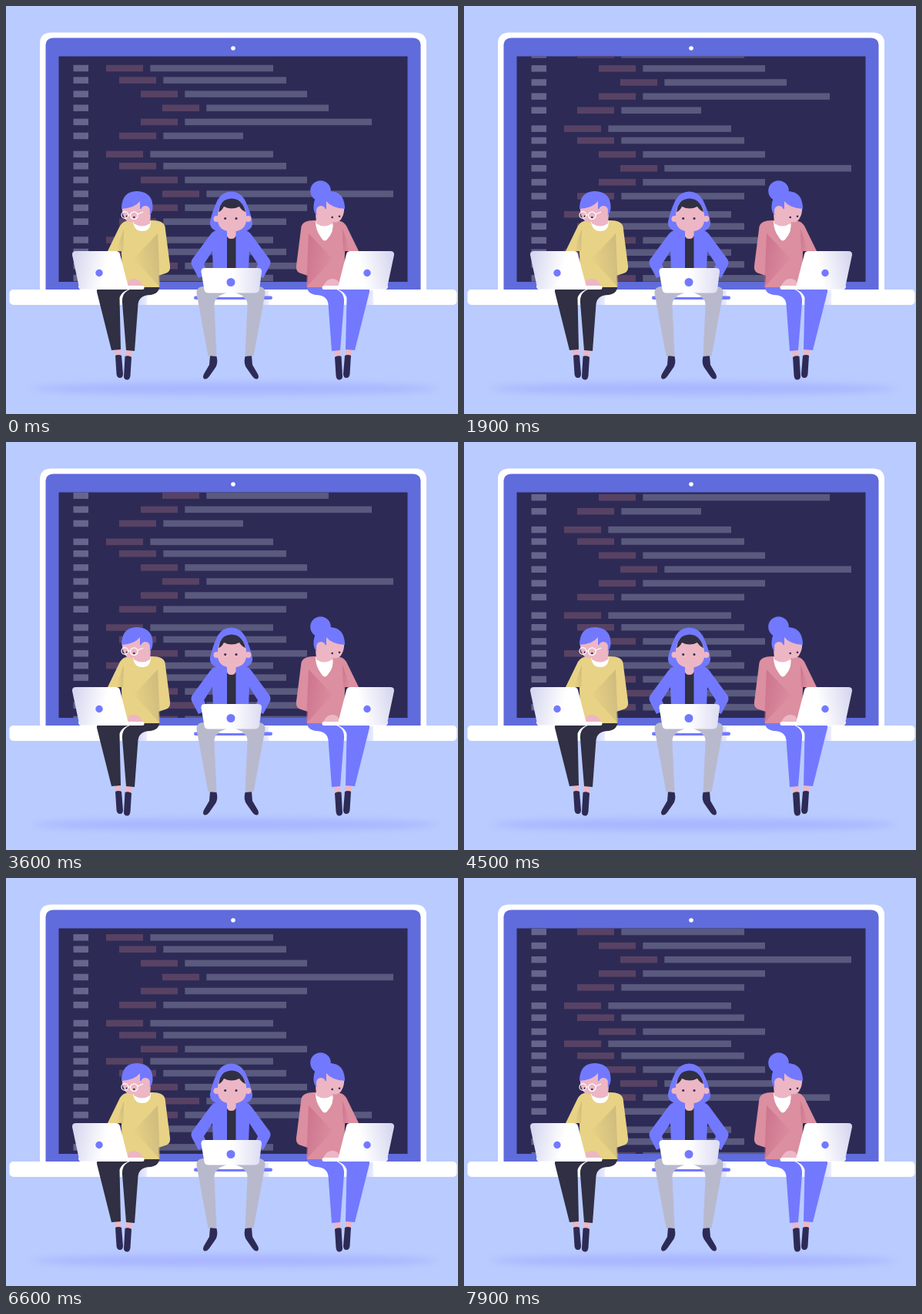
Write an HTML page that moves like this. It is 587 px wide and 531 px high and loops after 8000 ms.

```html
<!DOCTYPE html>
<html lang="en">
<head>
<meta charset="utf-8">
<title>Coding together</title>
<style>
  html, body { margin: 0; width: 100%; height: 100%; overflow: hidden; background: #bacbff; }
  svg { display: block; width: 587px; height: 531px; }
  .blue { fill: #7279ff; }
  .navy { fill: #2d2b55; }
  .skin { fill: #edb6c4; }
  .white { fill: #fff; }
  .top { fill: var(--top); }
  .shade { fill: var(--shade); }
  .legs { fill: var(--legs); }
  #ann { --top: #e8d285; --shade: #c9b67d; --legs: #302f43; }
  #bea { --top: #db8fa0; --shade: #cb6f8b; --legs: #7279ff; }
</style>
</head>
<body>
<svg viewBox="0 0 587 531" xmlns="http://www.w3.org/2000/svg">
  <defs>
    <clipPath id="screen"><rect x="68.5" y="65.5" width="453" height="293.5"/></clipPath>
    <filter id="soft" x="-10%" y="-100%" width="120%" height="300%"><feGaussianBlur stdDeviation="7 4"/></filter>
    <linearGradient id="lid" x1="0" x2="1" y1="0" y2="0.15">
      <stop offset="0" stop-color="#d2d3ee"/><stop offset="0.65" stop-color="#fff"/>
    </linearGradient>
    <linearGradient id="lidMid" x1="0" x2="1" y1="0" y2="0">
      <stop offset="0.5" stop-color="#fff"/><stop offset="1" stop-color="#dcdcf2"/>
    </linearGradient>
    <linearGradient id="deskShade">
      <stop offset="0" stop-color="#c8cffb"/><stop offset="1" stop-color="#eaedff"/>
    </linearGradient>
    <linearGradient id="fade" x1="1" y1="0.2" x2="0" y2="0.6">
      <stop offset="0" stop-color="#fff" stop-opacity="0.85"/><stop offset="1" stop-color="#fff" stop-opacity="0"/>
    </linearGradient>
    <mask id="fold" maskUnits="userSpaceOnUse" x="130" y="270" width="90" height="110">
      <path d="M197 296 L200 366 L166 329 Z" fill="url(#fade)"/>
      <path d="M153 290 L152 319 L143 319 Z" fill="url(#fade)"/>
    </mask>

    <!-- Seated body and head, shared by both outer people -->
    <g id="body">
      <path class="skin" d="M141 444 L149 444 L149 457 L142 457 Z M156 446 L164 446 L163 459 L155 459 Z"/>
      <path class="navy" d="M142 455 Q146 453 150 455 L152 479 Q152 484 148 484 Q144 484 143.500 479 Z"/>
      <path class="navy" d="M154.500 456 Q159 454 163 457 L161.500 481 Q161 486.500 157 486.500 Q153 486 153 482 Z"/>
      <path class="legs" d="M118 372 Q117 367 124 367 L166 367 Q150 370 147.500 380 L149 447 L137 448 Z"/>
      <path class="legs" d="M160 366 L199 361 Q201 374 188 376 Q173 376 171.500 388 L167 449 L156 448 L151 386 Q150 372 163 368 Z"/>
      <path class="top" d="M153 281 Q160 278 167 279 L187 279 Q204 278 206.500 287 L213 338 Q214 346 207 348 L198 351 L199 366 L151 366 L150 319 L132 319 L148 286 Q150 283 153 281 Z"/>
      <rect class="shade" x="130" y="280" width="80" height="90" mask="url(#fold)"/>
      <path class="skin" d="M157 364 Q157 356 165 355 Q173 354 178 364 Z"/>
      <path class="white" d="M94 364 H177 Q179.500 364 179.500 366.500 Q179.500 369 177 369 H98 Q94 369 94 364 Z"/>
      <path fill="url(#lid)" d="M91 319 H143 Q147 319 148 323 L158.500 364 Q159.500 368.500 155 368.500 H100 Q95.500 368.500 94.500 364 L86 324 Q85.500 319 91 319 Z"/>
      <circle class="blue" cx="121" cy="347.500" r="4.700"/>
    </g>
    <g id="head">
      <path class="skin" d="M151 259 L180 251 L188 270 L187 283 Q177 290 166 283 L166 281 Q157 283 154 276 Q150 269 151 259 Z"/>
      <path class="blue" d="M150 264 Q150 241 170.500 241 Q191 242 190.500 263 Q190 270 186 273 L174 266 L174 254 Q167 263 150 264 Z"/>
      <circle class="skin" cx="181" cy="266" r="6"/>
      <path class="skin" d="M174 264 L187 268 L186 280 L172 279 Z"/>
      <circle class="navy" cx="157" cy="273.800" r="1.300"/>
      <circle class="navy" cx="166.300" cy="275" r="1.300"/>
    </g>
    <!-- Half of the middle person -->
    <g id="half">
      <path class="navy" d="M265 455 L273.500 456 Q276 466 271 472 L264 482 Q260 487 257 485 Q255 483 257 479 L264 467 Z"/>
      <path fill="#b9b9cd" d="M247.500 374 Q247 365 257 365 H292 V373 L276 379 Q270 382 270.500 391 L273.500 455 L262.500 455.500 Z"/>
      <path class="blue" d="M292 292 H275 Q269 292 265 298 L241.500 330 Q239.500 334 241.500 338 L250 354 L262 348 L257 336 L268 319 L269 345 H292 Z"/>
    </g>
  </defs>

  <rect width="587" height="531" fill="#bacbff"/>
  <ellipse cx="298" cy="498" rx="262" ry="8" fill="#a9b6ff" filter="url(#soft)"/>

  <path class="white" d="M44 375 V49 Q44 34.500 59 34.500 H531 Q546 34.500 546 49 V375 Z"/>
  <path fill="#606bdc" d="M51.500 370 V52 Q51.500 41.500 62 41.500 H528 Q538.500 41.500 538.500 52 V370 Z"/>
  <rect class="navy" x="68.500" y="65.500" width="453" height="293.500"/>
  <circle class="white" cx="295" cy="55" r="2.800"/>
  <g clip-path="url(#screen)"><g id="code"></g></g>

  <rect class="white" x="4.500" y="369" width="581" height="20" rx="5"/>
  <g fill="url(#deskShade)">
    <rect x="167" y="375" width="16" height="14"/>
    <rect x="325" y="370" width="16" height="19"/>
    <rect x="461" y="370" width="16" height="19"/>
  </g>
  <rect class="blue" x="244" y="377.500" width="102" height="4.500" rx="2.200"/>

  <g id="ann">
    <use href="#body"/>
    <path class="white" d="M165 280 Q176 286 188 280 Q188 293 177 293 Q166 293 165 280 Z"/>
    <use href="#head"/>
    <g fill="none" stroke="#fff" stroke-width="1.200">
      <circle cx="154.300" cy="272" r="4.300"/>
      <circle cx="166.300" cy="272.600" r="4.800"/>
      <path d="M158.500 272 H161.500 M171 271 L178 268"/>
    </g>
  </g>

  <g id="cal">
    <path class="white" d="M270 379 L292 371 L314 379 Z"/>
    <use href="#half"/>
    <use href="#half" transform="matrix(-1 0 0 1 584 0)"/>
    <path class="white" d="M275 378 L287 373 H298 L309 378 Z"/>
    <path fill="#302f43" d="M287 298 H298.500 V343 H287 Z"/>
    <path class="blue" d="M292.500 241.500 Q304 241.500 310 252 Q317 266 320 281 Q321 289 312 293 Q302 297 298 300 H287 Q283 297 273 293 Q264 289 265 281 Q268 266 275 252 Q281 241.500 292.500 241.500 Z"/>
    <path class="skin" d="M287 288 H298.500 V298 Q298 303 292.700 303 Q287 303 287 298 Z"/>
    <circle class="skin" cx="273.500" cy="277" r="4"/>
    <circle class="skin" cx="314.500" cy="277" r="4"/>
    <path class="skin" d="M275 271 Q276 258 284 254 H302 Q310 258 312 271 V280 Q310 293.500 293.500 293.500 Q277 293.500 275 280 Z"/>
    <path fill="#302f43" d="M276 268 Q278 255 286 252 Q293 249 300 252 Q309 257 311 268 Q306 266 303 261 Q293 266 283 261 Q280 267 276 268 Z"/>
    <circle class="navy" cx="284.700" cy="276.500" r="1.500"/>
    <circle class="navy" cx="299" cy="276.500" r="1.500"/>
    <path fill="url(#lidMid)" d="M258 341 H327 Q332.500 341 332 346 L329 369 Q328 373.500 323 373.500 H263 Q258 373.500 257.500 369 L253.500 346 Q253 341 258 341 Z"/>
    <circle class="blue" cx="292" cy="359.500" r="5.500"/>
  </g>

  <g id="bea">
    <circle class="blue" cx="408.500" cy="240.500" r="13.300"/>
    <g transform="matrix(-1 0 0 1 590 0)"><use href="#body"/></g>
    <path class="white" d="M402 280 L424 280 Q427 293 417 304 Q413 308 409 301 Q402 292 402 280 Z"/>
    <g transform="matrix(-1 0 0 1 590 0)"><use href="#head"/></g>
  </g>
</svg>
<script>
  // Each row: centre y, tag x, bar end
  const rows = [
    [81, 130, 347], [96.6, 147, 364], [114.6, 175, 391], [132.7, 203, 419], [150.9, 175, 475], [169, 147, 308],
    [192.9, 130, 347], [208.3, 147, 364], [226.4, 175, 391], [244.5, 203, 503], [262.6, 175, 391], [280.7, 147, 364],
    [304.5, 130, 347], [320, 147, 364], [338.2, 175, 391]
  ];
  const period = 273, loop = 8000, frame = 100, speed = 17.5;
  const code = document.getElementById('code');

  function bar(x, end, y, fill) {
    const rect = document.createElementNS('http://www.w3.org/2000/svg', 'rect');
    const attrs = { x, y: y - 4.25, width: end - x, height: 8.5, fill };
    for (const key in attrs) rect.setAttribute(key, attrs[key]);
    code.append(rect);
  }

  for (const shift of [0, period]) {
    for (const [y, x, end] of rows) {
      bar(87.5, 107, y + shift, '#66658c');
      bar(x, x + 48, y + shift, '#584264');
      bar(x + 57.3, end, y + shift, '#5a597e');
    }
  }

  function draw() {
    const step = Math.floor(performance.now() % loop / frame);
    const y = -step * frame / 1000 * speed;
    code.setAttribute('transform', `translate(0 ${y})`);
    requestAnimationFrame(draw);
  }
  draw();
</script>
</body>
</html>
```
